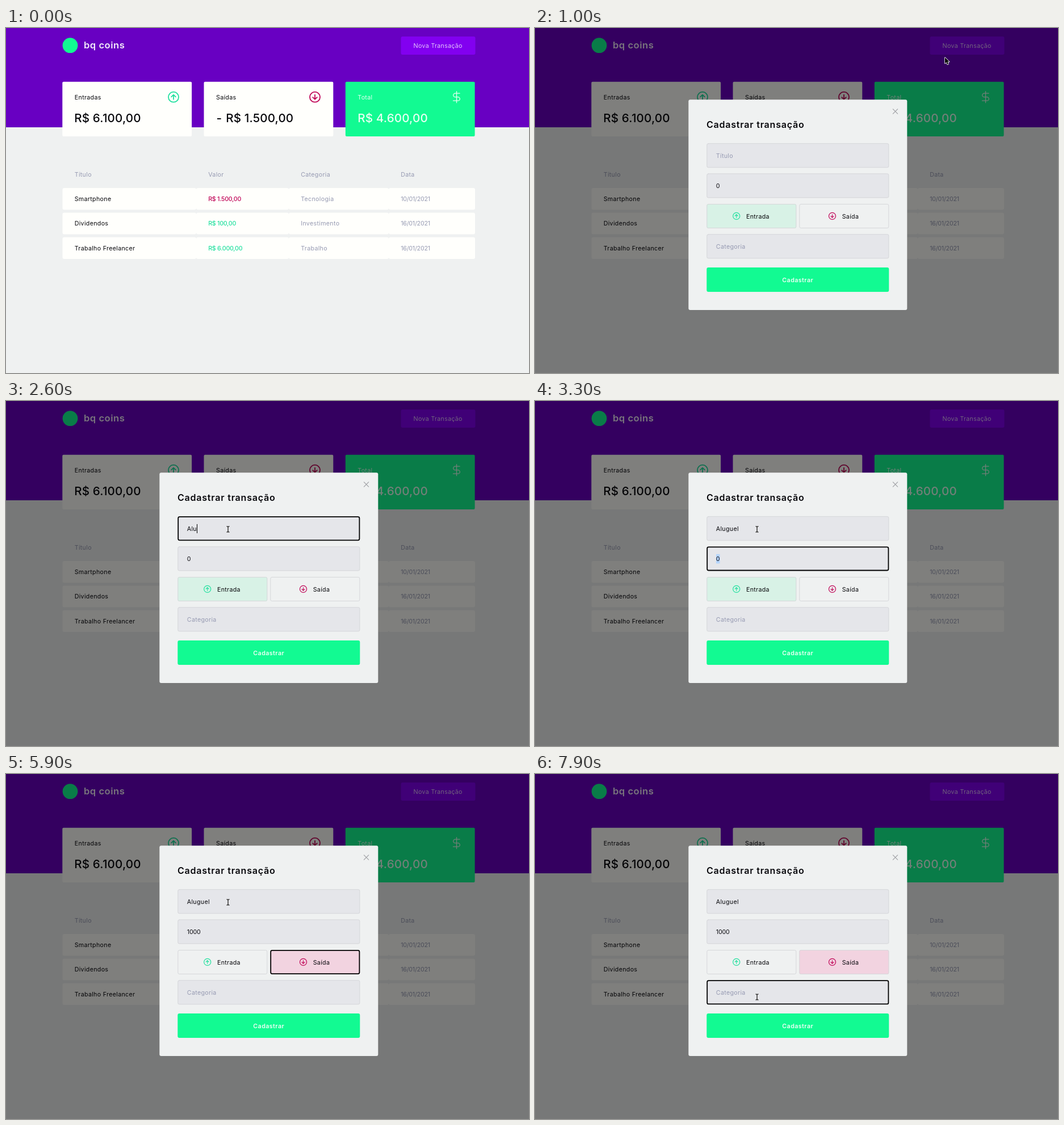
Animation, 921 px wide and 608 px high, one loop 8 s. Source, as an HTML page with a canvas:

```html
<!DOCTYPE html>
<html lang="pt-BR">
<head>
<meta charset="utf-8">
<title>Transações</title>
<style>
  html, body { margin: 0; width: 100%; height: 100%; overflow: hidden; background: #eff1f1; }
  canvas { display: block; width: 921px; height: 608px; }
</style>
</head>
<body>
<canvas id="stage" width="921" height="608"></canvas>
<script>
const ctx = document.getElementById('stage').getContext('2d');
const LOOP = 8000, STEP = 100;

const PURPLE = '#6800c2', GREEN = '#12fa92', MINT = '#20e09e', RED = '#c00456';
const PAGE = '#eff1f1', CARD = '#fffffc', INK = '#08080c', MUTED = '#969ab2', FIELD = '#e5e6ea';

// Text styles: size, weight, letter spacing in em
const BODY = [10.67, 400, 0.03];
const LIGHT = [10.67, 350, 0.038];
const STRONG = [10.67, 600, 0.042];
const NUM = [10.67, 400, -0.02];
const PRICE = [10.67, 500, -0.025];
const TOTAL = [20.6, 500, 0.007];
const HEADING = [16, 600, 0.049];
const BRAND = [16.6, 600, 0.03];

function setFont([size, weight, gap]) {
  ctx.font = `${weight} ${size}px Inter, "Open Sans", sans-serif`;
  ctx.letterSpacing = `${size * gap}px`;
}

function text(s, x, y, style, color, align = 'left') {
  setFont(style);
  ctx.fillStyle = color;
  ctx.textAlign = align;
  ctx.fillText(s, x, y);
}

function box(x, y, w, h, fill, r = 3) {
  ctx.beginPath();
  ctx.roundRect(x, y, w, h, r);
  ctx.fillStyle = fill;
  ctx.fill();
}

function line(path, color, width) {
  ctx.strokeStyle = color;
  ctx.lineWidth = width;
  ctx.lineCap = ctx.lineJoin = 'round';
  ctx.stroke(new Path2D(path));
}

function disc(x, y, r, fill) {
  ctx.beginPath();
  ctx.arc(x, y, r, 0, Math.PI * 2);
  ctx.fillStyle = fill;
  ctx.fill();
}

function at(x, y, draw, scale = 1) {
  ctx.save();
  ctx.translate(x, y);
  ctx.scale(scale, scale);
  draw();
  ctx.restore();
}

// dir: -1 points up, 1 points down
function arrowIcon(x, y, r, dir, color) {
  at(x, y, () => {
    line('M-9 0a9 9 0 1 0 18 0a9 9 0 1 0 -18 0', color, 1.8);
    ctx.scale(1, dir);
    line('M0 -4V4M-3.8 .4L0 4L3.8 .4', color, 1.8);
  }, r / 9);
}

function dollarIcon(x, y, color) {
  at(x, y, () => line('M0 -10V10M5.5 -6.5H-2.5a3.2 3.2 0 0 0 0 6.5H2.5a3.2 3.2 0 0 1 0 6.5H-6', color, 1.3));
}

function drawCard(x, label, color, fill) {
  box(x, 94.7, 227.8, 96.4, fill, 2);
  text(label, x + 21.5, 126, BODY, color);
}

const COLS = [99.5, 335, 498, 674, 826];
const HEADS = ['Título', 'Valor', 'Categoria', 'Data'];
const ROWS = [
  ['Smartphone', 'R$ 1.500,00', 'Tecnologia', '10/01/2021', RED],
  ['Dividendos', 'R$ 100,00', 'Investimento', '16/01/2021', MINT],
  ['Trabalho Freelancer', 'R$ 6.000,00', 'Trabalho', '16/01/2021', MINT]
];

function drawTable() {
  const pad = 21.2;
  HEADS.forEach((s, i) => text(s, COLS[i] + pad, 261.7, BODY, MUTED));
  ROWS.forEach(([title, value, category, date, color], i) => {
    const y = 282 + i * 43.4, base = y + 23;
    for (let c = 0; c < 4; c++) box(COLS[c], y, COLS[c + 1] - COLS[c], 38.2, CARD);
    text(title, COLS[0] + pad, base, BODY, INK);
    text(value, COLS[1] + pad, base, PRICE, color);
    text(category, COLS[2] + pad, base, BODY, MUTED);
    text(date, COLS[3] + pad, base, NUM, MUTED);
  });
}

function drawPage(t) {
  ctx.fillStyle = PAGE;
  ctx.fillRect(0, 0, 921, 608);
  ctx.fillStyle = PURPLE;
  ctx.fillRect(0, 0, 921, 175);

  disc(113, 30.7, 13.4, GREEN);
  text('bq coins', 137, 36.3, BRAND, '#f4ecfa');

  box(695.5, 15, 131, 32, '#8200f0');
  text('Nova Transação', 760.7, 34.8, LIGHT, '#fff', 'center');
  const hover = t >= 1000 ? 0 : Math.min(1, Math.max(0, (t - 700) / 200));
  if (hover) box(695.5, 15, 131, 32, `rgba(0,0,0,${hover * 0.1})`);

  drawCard(99.3, 'Entradas', INK, CARD);
  drawCard(348.5, 'Saídas', INK, CARD);
  drawCard(597.8, 'Total', '#e6fff2', GREEN);
  text('R$ 6.100,00', 120.3, 166, TOTAL, INK);
  text('-', 370.5, 165.5, TOTAL, INK);
  text('R$ 1.500,00', 387.3, 166, TOTAL, INK);
  text('R$ 4.600,00', 619.3, 166, TOTAL, '#e6fff2');
  arrowIcon(295, 121.7, 9, -1, MINT);
  arrowIcon(544, 121.7, 9, 1, RED);
  dollarIcon(793.5, 121.7, '#e6fff2');

  drawTable();
}

// Moments at which each character is typed
const TITLE = { text: 'Aluguel', times: [2000, 2300, 2600, 2800, 2900, 3000, 3100] };
const VALUE = { text: '1000', times: [4100, 4300, 4500, 4600] };
const typed = (entry, t) => entry.text.slice(0, entry.times.filter(k => k <= t).length);

function focusAt(t) {
  if (t < 1700) return '';
  if (t < 3300) return 'title';
  if (t < 4700) return 'value';
  if (t < 5600) return 'in';
  return t < 6200 ? 'out' : 'category';
}

function frame(x, y, w, h, fill, focused) {
  box(x, y, w, h, fill);
  ctx.beginPath();
  const d = focused ? 0.9 : 0.5;
  ctx.roundRect(x + d, y + d, w - 2 * d, h - 2 * d, 2.5);
  ctx.strokeStyle = focused ? '#000' : '#d6d7da';
  ctx.lineWidth = focused ? 1.8 : 1;
  ctx.stroke();
}

function drawField(y, value, hint, focused, { style = BODY, caret = false, selected = false } = {}) {
  frame(302.3, y, 321, 43, FIELD, focused);
  setFont(style);
  const width = ctx.measureText(value).width;
  if (selected) {
    ctx.fillStyle = '#b4d5fe';
    ctx.fillRect(319, y + 13.5, width, 16.5);
  }
  text(value || hint, 318.8, y + 25.8, style, value ? INK : MUTED);
  if (focused && caret) {
    ctx.fillStyle = '#000';
    ctx.fillRect(Math.round(319 + width), Math.round(y + 13.7), 1, 16);
  }
}

function drawChoice(x, label, fill, focused, dir, color, iconX) {
  frame(x, 310, 158, 43, fill, focused);
  arrowIcon(iconX, 331.4, 6, dir, color);
  text(label, iconX + 17.2, 335.5, BODY, INK);
}

function drawModal(t) {
  const focus = focusAt(t);
  const isOut = t >= 5900;
  const value = typed(VALUE, t);
  const blinkOn = t < 6800 || (t >= 7400 && t < 7900);

  ctx.fillStyle = 'rgba(0,0,0,.5)';
  ctx.fillRect(0, 0, 921, 608);
  box(270.3, 126.3, 385, 370.7, PAGE);
  line('M630.4 142.9l8.2 8.2m0 -8.2l-8.2 8.2', '#a2a4a8', 1.3);
  text('Cadastrar transação', 302, 175.8, HEADING, INK);

  drawField(203.2, typed(TITLE, t), 'Título', focus === 'title', { caret: true });
  drawField(256.4, value || '0', '', focus === 'value',
    { style: NUM, caret: value !== '', selected: focus === 'value' && !value });
  drawChoice(302.3, 'Entrada', isOut ? PAGE : '#d8f2e6', focus === 'in', -1, MINT, 354.7);
  drawChoice(465.3, 'Saída', isOut ? '#f2d3e0' : PAGE, focus === 'out', 1, RED, 523.5);
  drawField(363.3, '', 'Categoria', focus === 'category', { caret: blinkOn });

  box(302.3, 422, 321, 43, GREEN);
  text('Cadastrar', 462.7, 447.7, STRONG, '#effff6', 'center');
}

// Pointer path: time, x, y
const PATH = [
  [400, 905, 330], [600, 828, 160], [800, 770, 42], [900, 762, 29],
  [1000, 722, 52], [1100, 560, 122], [1200, 437, 159], [1300, 437, 159],
  [1500, 402, 208], [1700, 391, 226], [6700, 391, 226], [6900, 420, 262],
  [7100, 448, 325], [7300, 405, 386], [7400, 391, 393], [8000, 391, 393]
];

function pointerAt(t) {
  const i = PATH.findIndex(p => p[0] > t);
  const [t0, x0, y0] = PATH[i - 1], [t1, x1, y1] = PATH[i];
  const k = (t - t0) / (t1 - t0);
  return [x0 + (x1 - x0) * k, y0 + (y1 - y0) * k];
}

function inside(x, y, l, top, r, b) {
  return x >= l && x <= r && y >= top && y <= b;
}

function pointerKind(t, x, y) {
  if (t < 1000) return inside(x, y, 695, 15, 827, 47) ? 'hand' : 'arrow';
  if (inside(x, y, 302, 310, 460, 353)) return 'hand';
  return [203, 256, 363].some(top => inside(x, y, 302, top, 623, top + 43)) ? 'beam' : 'arrow';
}

function outlined(path, fill, edge) {
  const p = new Path2D(path);
  ctx.lineJoin = 'round';
  ctx.strokeStyle = edge;
  ctx.lineWidth = 1.6;
  ctx.stroke(p);
  ctx.fillStyle = fill;
  ctx.fill(p);
}

const POINTERS = {
  arrow: () => outlined('M0 0V10.5L2.5 8.3L4.2 12.2L6 11.4L4.3 7.6H7.6Z', '#000', '#fff'),
  hand: () => outlined('M-1 .5Q0 -.8 1 .5V4L5.5 5Q6.8 5.3 6.5 7L5.5 10H-1L-4 6.3Q-3.6 4.8 -1 6.3Z', '#fff', '#000'),
  beam: () => {
    const stem = 'M-2 -5Q0 -5 0 -3.5Q0 -5 2 -5M0 -3.5V3.5M-2 5Q0 5 0 3.5Q0 5 2 5';
    line(stem, '#f4f4f6', 2.6);
    line(stem, '#333', 1.5);
  }
};

function render(t) {
  drawPage(t);
  if (t >= 1000) drawModal(t);
  if (t >= 400) {
    const [x, y] = pointerAt(t);
    at(x, y, POINTERS[pointerKind(t, x, y)]);
  }
}

const start = performance.now();
function tick() {
  const t = (performance.now() - start) % LOOP;
  render(Math.floor(t / STEP) * STEP);
  requestAnimationFrame(tick);
}
tick();
</script>
</body>
</html>
```
